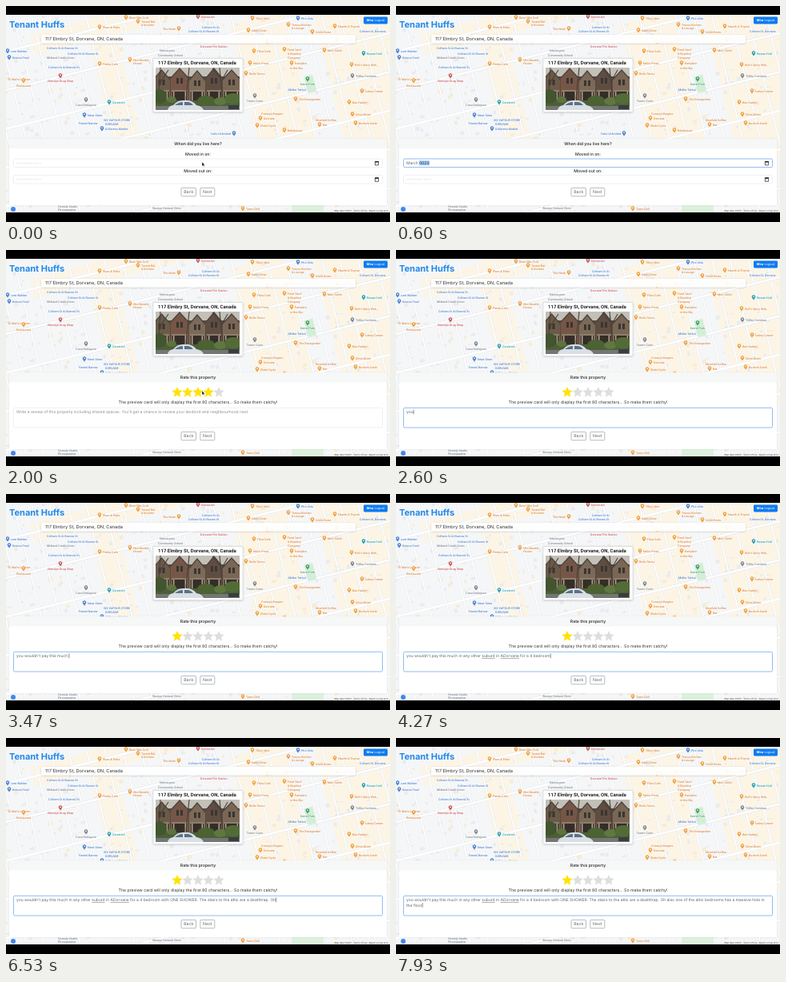
An HTML page that plays this animation: 480x270 px, repeating every 8000 ms.

```html
<!DOCTYPE html>
<html lang="en">
<head>
<meta charset="utf-8">
<title>Tenant Huffs</title>
<style>
  html, body { margin: 0; width: 100%; height: 100%; overflow: hidden; background: #000; }
  svg { display: block; width: 480px; height: 270px; }
  text { font-family: Inter, "Open Sans", sans-serif; font-size: 5.2px; fill: #333; text-rendering: geometricPrecision; white-space: pre; }
  .mid { text-anchor: middle; }
  .head { font-weight: 500; fill: #222; }
  .small { font-size: 4.95px; fill: #606468; }
  .hint { fill: #888c91; }
  .poi { font: 500 3.7px Roboto, "Open Sans", sans-serif; stroke: #fff; stroke-width: .5px; paint-order: stroke; }
  .typo { text-decoration: underline; text-decoration-thickness: .4px; text-decoration-color: #8a7070; }
  .box { fill: #fff; stroke: #dcdfe3; stroke-width: .5px; }
  .focus { stroke: #8fbcf3; stroke-width: 1px; }
</style>
</head>
<body>
<svg id="stage" viewBox="0 0 480 270"></svg>
<script>
const LOOP = 8000;
const ADDRESS = "117 Elmbry St, Dorvane, ON, Canada";
const REVIEW = "you wouldn't pay this much in any other suburd in ADorvane for a 4 bedroom" +
  " with ONE SHOWER. The stairs to the attic are a deathtrap. Oh also one of the attic" +
  " bedrooms has a massive hole in\nthe floor";
const upTo = s => REVIEW.indexOf(s) + s.length;

// Time, characters typed
const TYPING = [
  [2420, 0], [2600, 3], [3070, 10], [3930, 48], [4250, upTo("bedroom")],
  [5070, upTo("SHOWER.")], [5930, upTo("attic a")], [6520, upTo("Oh")],
  [6800, upTo("one of the")], [7670, upTo("hole in")], [7920, REVIEW.length]
];
// Time, month, year, active part
const MOVED_IN = [
  [0, "", "", ""], [140, "", "", "m"], [330, "March", "", "m"], [400, "March", "", "y"],
  [530, "March", "0002", "y"], [600, "March", "0020", "y"], [670, "March", "0200", "y"],
  [800, "March", "2006", "y"], [930, "March", "2006", ""]
];
const MOVED_OUT = [
  [0, "", "", ""], [930, "", "", "m"], [1130, "November", "", "m"], [1400, "November", "", "y"],
  [1470, "November", "0002", "y"], [1530, "November", "0020", "y"],
  [1600, "November", "0200", "y"], [1670, "November", "2009", ""]
];
const RATING = [[0, 0], [1870, 2], [1930, 3], [2000, 4], [2200, 3], [2270, 2], [2330, 1]];
const POINTER = [[0, 245, 197], [70, 245, 197], [200, 20, 197], [1650, 252, 233],
  [1760, 252, 231], [2000, 245, 178], [2130, 245, 178], [2330, 214, 179], [2420, 60, 206]];

// Colour, pin side (^ is above), x, y, label
const PLACES = `
o<121 28 Plum & Patio
o<154 16 Baxo Mex Grill
o<169 21 Tavern Bar
o.169 25 & Kitchen
o>147 45 Ice Smirla
r<244 15 Dental Arc
o>212 30 The Nook
b.245 28 Colham St At
b.228 33 Colham St At Rowen St
o<312 17 Tilly's Wok
o<307 32 Sable Diner
b<369 17 Pho Velu
o<357 25 Tressa Kitchen
o.357 29 & Lounge
o<387 34 Uncle Borro
o<354 44 Pasta Fenn
b.51 54 Colham St At Barrow St
b.77 61 Colham St At Rowen St
b.53 78 Colham St At Barrow St
b<6 58 Lem Walden
b<8 66 Krasna Food
g.51 66 Midland Credit Union
o.3 93 El Marlo Lobster
o^22 101 Restaurant
r^68 95 Sherwyn Drug Shop
o<159 69 Oko Noodle
o.159 73 House
o<121 74 Fenna Cafe
g.192 57 Kelmington
g.190 63 Community School
r.243 52 Dorvane Fire Station
o<314 58 Fikra Cafe
o<309 73 Nellis Pizza
o<304 86 Bodo Tacos
o<330 46 Sumac Hut
o<352 56 Food Yard
o.352 61 & Bowling
o.352 66 Company
o<361 73 Pampero
o.355 79 in the Sky
p^377 99 Sorrel Park
b.353 106 Midler Tattoo
o<366 118 The Rosegarden
t<133 122 Cineloom
g^100 125 Casa Dorlagata
b<102 138 Newt Store
b.122 144 SIX VAPOUR STORE
b.124 149 DORVANE
b.91 148 Fennel Barrow
b<124 155 & Marrow Market
b>281 161 Yarlo Unlimited
g^311 120 Trams-Curio
o.319 136 Cressy's Burgers
o<322 142 Dorvane
o<318 151 Shale Cycle
o<352 157 Bakehouse
o.387 144 Ninefold Coffee
o<396 150 Bar
o<415 27 Hearth & Thyme
o<402 57 Mori Sushi
o<418 44 Rumi's Deli
b.442 33 Colham St, Dorvane
t<451 61 Rowan Hall
o<436 75 Rolf's Spicy Wok
g<437 89 Trillby Common
o<449 108 Latino Corner
o<433 122 Bao Harbor
o<437 137 Olmo Bistro
o<441 148 Burlock Sushi
g.65 251.5 Homely Studio
g.65 256 Photographer
g.183 254 Weston General Clinic
o<300 255 Tamo Grill`;
const TINT = { o: "#d9863f", b: "#4a82d4", g: "#7d858f", r: "#cc5a5f", p: "#3e9b62", t: "#25a0b4" };
const PIN = { ...TINT, o: "#f29f3c" };

const rect = (x, y, w, h, fill, extra = "") =>
  `<rect x="${x}" y="${y}" width="${w}" height="${h}" fill="${fill}" ${extra}/>`;
const path = (d, fill, extra = "") => `<path d="${d}" fill="${fill}" ${extra}/>`;
const text = (x, y, s, cls = "", extra = "") =>
  `<text x="${x}" y="${y}" class="${cls}" ${extra}>${s.replace(/&/g, "&amp;")}</text>`;
const repeat = (n, fn) => Array.from({ length: n }, (_, i) => fn(i)).join("");

function seeded(seed) {
  return () => (seed = (seed * 16807) % 2147483647) / 2147483647;
}

function streets() {
  const rnd = seeded(41);
  const road = (d, w) => path(d, "none", `stroke="#dfe2e7" stroke-width="${w + .7}"`) +
    path(d, "none", `stroke="#fff" stroke-width="${w}"`);
  const shops = rect(20, 42, 520, 26, "#fcf5e6") + rect(90, 40, 34, 200, "#fcf5e6") +
    rect(265, 90, 70, 190, "#fcf5e6") + rect(370, 60, 90, 240, "#fcf5e6");
  const blocks = repeat(800, () => rect(rnd() * 570 - 60, rnd() * 420 - 20,
    2 + rnd() * 4, 1 + rnd() * 4, rnd() < .3 ? "#f7ecd6" : "#e9ebee"));
  const lanes = repeat(26, i => road(`M${i * 22 - 60} -40V420`, 1.8));
  const avenues = repeat(9, i => road(`M-80 ${i * 47 + 8}H560`, 2.8));
  return `<g transform="rotate(-14)">${shops}${blocks}${lanes}${avenues}
    ${rect(340, 176, 11, 21, "#d3eed6")}</g>` + rect(357, 249, 40, 9, "#dcf1dd");
}

function pin(x, y, color) {
  return path(`M${x} ${y + 3.6}L${x - 2} ${y + .7}A2.3 2.3 0 1 1 ${x + 2} ${y + .7}Z`, color) +
    `<circle cx="${x}" cy="${y - .6}" r=".8" fill="#fff"/>`;
}

function places() {
  const anchors = { ">": "end", "^": "middle" };
  return PLACES.trim().split("\n").map(row => {
    const [, c, side, x, y, label] = row.match(/^(.)(.)(\d+) (\d+\.?\d*) (.+)$/);
    const dx = { "<": -4, ">": 4 }[side] || 0;
    return (side === "." ? "" : pin(+x + dx, y - (side === "^" ? 8 : 2), PIN[c])) +
      text(x, y, label, "poi", `style="fill:${TINT[c]}" text-anchor="${anchors[side] || "start"}"`);
  }).join("");
}

function house(x, w, top, wall) {
  const m = x + w / 2;
  return path(`M${x} 121V${top + 12}L${m} ${top}L${x + w} ${top + 12}V121Z`, wall) +
    path(`M${x} ${top + 12}L${m} ${top}L${x + w} ${top + 12}`, "none", 'stroke="#4a4340" stroke-width="1.2"') +
    rect(m - 4, top + 12, 3, 7, "#393532") + rect(m + 1, top + 12, 3, 7, "#393532") +
    rect(x + 1, 105, w - 2, 2, "#8d7e6c") + rect(x + 2, 107, w - 4, 11, "#352e28") +
    rect(x + 3, 107, 1.4, 11, "#b8aa98") + rect(x + w - 4.4, 107, 1.4, 11, "#b8aa98");
}

function photo() {
  const bush = (x, y, rx, ry, fill) => `<ellipse cx="${x}" cy="${y}" rx="${rx}" ry="${ry}" fill="${fill}"/>`;
  return `<g clip-path="url(#frame)">` + rect(187, 77, 105, 53, "#c3c0b8") +
    rect(187, 88, 105, 36, "#594b3f") +
    house(184, 21, 80, "#6b5a48") + house(206, 22, 78, "#765647") +
    house(229, 20, 81, "#7c6a58") + house(250, 20, 78, "#604d41") + house(271, 22, 80, "#7a6655") +
    path("M190 122L193 77M193 95L203 80M225 116L229 77M271 119L267 77M268 96L277 80M268 90L258 78",
      "none", 'stroke="#473f37" stroke-width="1.1"') +
    rect(187, 118, 105, 7, "#4c5f38") + rect(187, 125, 105, 5, "#747674") +
    bush(192, 113, 9, 9, "#42552f") + bush(207, 117, 6, 4, "#5c7340") + bush(250, 118, 11, 6, "#4b6332") +
    bush(268, 119, 8, 5, "#5f7840") + bush(284, 116, 11, 7, "#536b37") +
    path("M202 130Q203 125 209 124Q214 118 221 118H228Q234 119 238 124Q245 125 247 130Z", "#d9dfe5") +
    path("M211 124Q216 120 221 120V124ZM223 120H228Q232 121 234 124H223Z", "#5b7088") +
    rect(278, 124, 13, 5, "#3a3d40") + `</g>`;
}

const star = (x, y) => "M" + Array.from({ length: 10 }, (_, k) => {
  const r = k % 2 ? 3.3 : 7, a = k * Math.PI / 5 - Math.PI / 2;
  return (x + r * Math.cos(a)).toFixed(2) + " " + (y + r * Math.sin(a)).toFixed(2);
}).join("L") + "Z";

const panel = (y, title) =>
  rect(4, y, 472, 249 - y, "#fff", 'filter="url(#faint)"') + rect(4, y, 472, 12, "#f6f7f7") +
  text(240, y + 7.6, title, "mid head");

const monthField = (id, y, label) =>
  text(240, y - 3.8, label, "mid head") +
  rect(9.5, y, 461, 10.6, "#fff", `id="${id}Box" class="box" rx="1.4"`) +
  rect(0, y + 2.2, 0, 6.2, "#a9cdf8", `id="${id}Mark"`) +
  text(13, y + 7, "", "small", `id="${id}Month"`) + text(13, y + 7, "", "small", `id="${id}Year"`) +
  path(`M461.4 ${y + 3.5}h4.2v4.4h-4.2Z`, "none", 'stroke="#222" stroke-width=".7"') +
  rect(461.2, y + 3, 4.6, 1.5, "#222");

const button = (x, w, label) =>
  rect(x, 227.4, w, 10.4, "#fff", 'rx="1.3" stroke="#858b91" stroke-width=".6"') +
  text(x + w / 2, 234.4, label, "mid", 'style="fill:#646a70"');

document.getElementById("stage").innerHTML = `
<defs>
  <filter id="soft" x="-10%" y="-30%" width="120%" height="160%"><feDropShadow dx="0" dy=".6" stdDeviation="1.2" flood-opacity=".2"/></filter>
  <filter id="faint" x="-5%" y="-10%" width="110%" height="120%"><feDropShadow dx="0" dy="0" stdDeviation=".8" flood-opacity=".08"/></filter>
  <clipPath id="map"><rect y="11" width="480" height="247"/></clipPath>
  <clipPath id="frame"><rect x="187" y="77" width="105" height="53"/></clipPath>
</defs>
<g clip-path="url(#map)">
  ${rect(0, 11, 480, 247, "#f5f6f7")}${streets()}
  ${places()}
  <circle cx="9" cy="254" r="3" fill="#4285f4"/>
  ${rect(405, 253.5, 75, 4.5, "#f5f5f5", 'opacity=".8"')}
  ${text(478, 257, "Map data ©2021   Terms of Use   Report a map error", "poi", 'text-anchor="end" style="font-size:2.9px;fill:#555"')}
</g>
${text(4, 26.8, "Tenant Huffs", "", 'style="font-size:11px;font-weight:700;fill:#2389e8"')}
${rect(447, 13.5, 30, 9, "#0d7bf2", 'rx="1.4"')}
<text x="462" y="19.4" class="mid" style="font-size:3.9px;fill:#fff"><tspan font-weight="700">Mira</tspan> Logout</text>
${rect(44, 36, 393, 10.5, "#fff", 'rx="2" filter="url(#soft)" opacity=".94"')}
${text(49, 43.2, ADDRESS, "", 'style="font-size:5.7px"')}
${rect(184, 65.5, 112, 67, "#fff", 'rx="1" filter="url(#soft)" stroke="#c5c8cb" stroke-width=".5"')}
${text(190, 73.4, ADDRESS, "", 'style="font:700 6px Roboto,sans-serif;fill:#222"')}
${photo()}
<g id="dates">
  ${panel(166, "When did you live here?")}
  ${monthField("in", 191, "Moved in on:")}${monthField("out", 211.4, "Moved out on:")}
</g>
<g id="rate">
  ${panel(153.5, "Rate this property")}
  ${repeat(5, i => path(star(214 + i * 13, 178), "#dedede", 'class="star"'))}
  ${text(240, 191.6, "The preview card will only display the first 80 characters... So make them catchy!", "mid")}
  ${rect(9.5, 197.3, 461, 24.7, "#fff", 'id="area" class="box" rx="1.4"')}
  ${text(13, 204.2, "Write a review of this property including shared spaces. You'll get a chance to review your landlord and neighbourhood next.", "small hint", 'id="hint"')}
  <text x="13" y="204.2" class="small"><tspan id="a"></tspan><tspan id="b" class="typo"></tspan><tspan id="c"></tspan><tspan id="d" class="typo"></tspan><tspan id="e"></tspan></text>
  ${text(13, 210.8, "", "small", 'id="second"')}
  ${rect(13, 199.4, .5, 5.8, "#222", 'id="caret"')}
</g>
${button(219, 18.5, "Back")}${button(242.8, 18, "Next")}
${path("M0 0V5.2L1.3 4.1L2.2 6L3 5.6L2.1 3.8H3.7Z", "#111", 'id="pointer" stroke="#fff" stroke-width=".4"')}`;

const $ = id => document.getElementById(id);
const stars = document.querySelectorAll(".star");
const parts = ["a", "b", "c", "d", "e"].map($);
const [firstLine, secondLine] = REVIEW.split("\n");
const pieces = firstLine.split(/(suburd|ADorvane)/);

const stepAt = (table, t) => table.filter(row => row[0] <= t).pop();
function blend(table, t, col) {
  const i = table.findIndex(row => row[0] > t);
  if (i < 0) return table[table.length - 1][col];
  if (i === 0) return table[0][col];
  const [p, q] = [table[i - 1], table[i]];
  return p[col] + (q[col] - p[col]) * (t - p[0]) / (q[0] - p[0]);
}

function drawField(id, [, month, year, active]) {
  const m = $(id + "Month"), y = $(id + "Year"), mark = $(id + "Mark");
  m.textContent = month || "---------";
  y.textContent = year || "----";
  m.style.fill = active === "m" ? "#1d2b3c" : month ? "" : "#b9bcc0";
  y.style.fill = active === "y" ? "#1d2b3c" : year ? "" : "#b9bcc0";
  const yearX = 13 + m.getComputedTextLength() + 1.4;
  y.setAttribute("x", yearX);
  const on = active === "y" ? y : m;
  mark.setAttribute("x", (on === y ? yearX : 13) - .3);
  mark.setAttribute("width", active ? on.getComputedTextLength() + .6 : 0);
  $(id + "Box").classList.toggle("focus", !!active);
}

function drawReview(t) {
  const n = Math.floor(blend(TYPING, t, 1) + 1e-6);
  let left = Math.min(n, firstLine.length);
  pieces.forEach((s, i) => {
    parts[i].textContent = s.slice(0, Math.max(0, left));
    left -= s.length;
  });
  const wrapped = n > firstLine.length + 1;
  $("second").textContent = wrapped ? secondLine.slice(0, n - firstLine.length - 1) : "";
  const line = wrapped ? $("second") : parts[0].parentNode;
  const focused = t >= 2400;
  $("caret").setAttribute("x", 13.2 + (n ? line.getComputedTextLength() : 0));
  $("caret").setAttribute("y", wrapped ? 206 : 199.4);
  $("caret").style.display = focused ? "" : "none";
  $("hint").style.display = n ? "none" : "";
  $("area").classList.toggle("focus", focused);
}

function draw(t) {
  const rating = t >= 1730;
  $("dates").style.display = rating ? "none" : "";
  $("rate").style.display = rating ? "" : "none";
  if (rating) {
    const lit = stepAt(RATING, t)[1];
    stars.forEach((s, i) => s.setAttribute("fill", i < lit ? "#ffe20a" : "#dedede"));
    drawReview(t);
  } else {
    drawField("in", stepAt(MOVED_IN, t));
    drawField("out", stepAt(MOVED_OUT, t));
  }
  const shown = t < 260 || (t >= 1650 && t < 2440);
  $("pointer").style.display = shown ? "" : "none";
  $("pointer").setAttribute("transform", `translate(${blend(POINTER, t, 1)} ${blend(POINTER, t, 2) - 2})`);
}

const start = performance.now();
function tick() {
  draw((performance.now() - start) % LOOP);
  requestAnimationFrame(tick);
}
draw(0);
requestAnimationFrame(tick);
</script>
</body>
</html>
```
